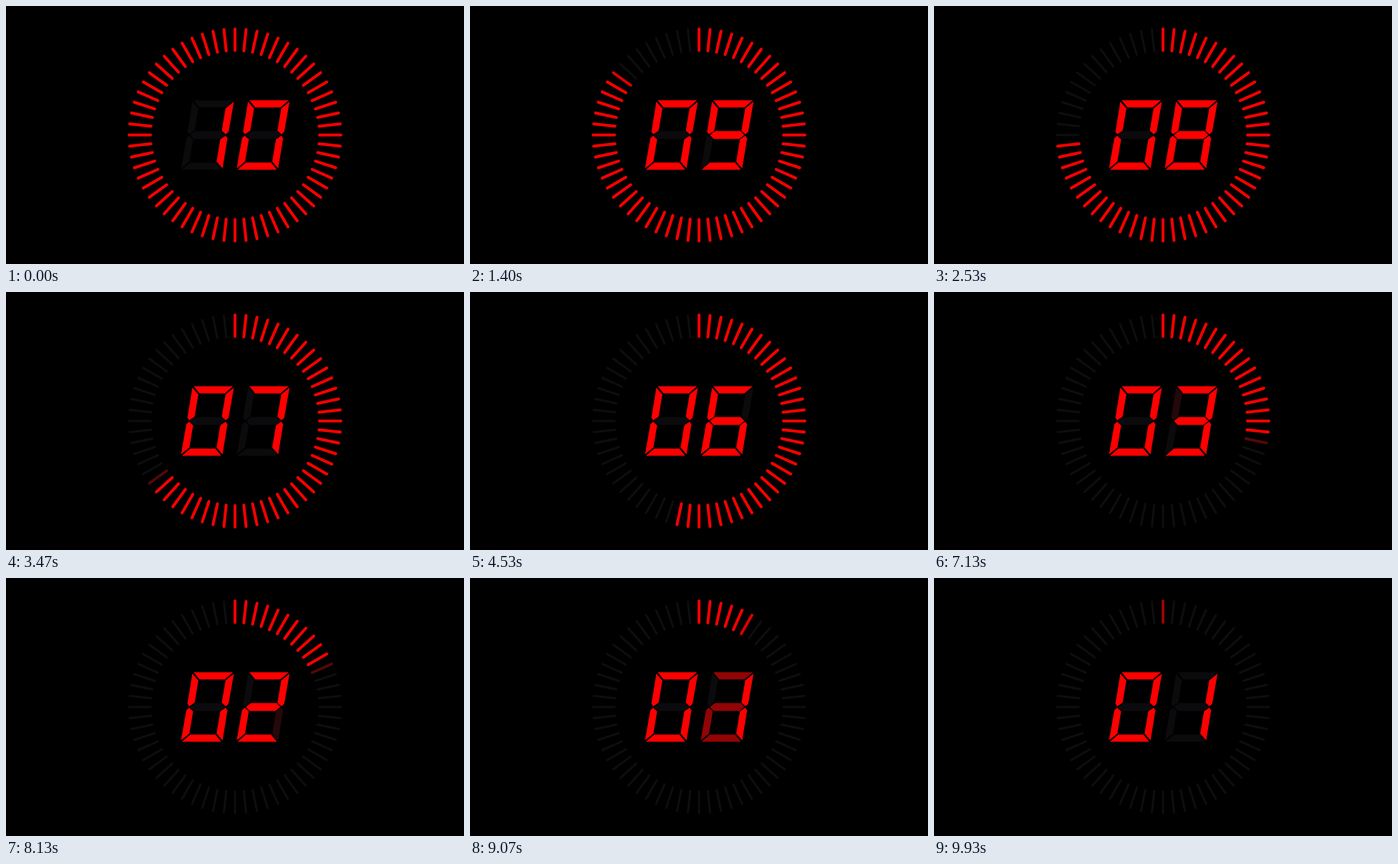
These frames come from a looping animation (640 by 360 pixels, 9990 ms). An HTML page with a canvas:

```html
<!DOCTYPE html>
<html lang="en">
<head>
<meta charset="utf-8">
<title>Countdown</title>
<style>
  html, body { margin: 0; width: 100%; height: 100%; overflow: hidden; background: #000; }
  canvas { display: block; width: 640px; height: 360px; }
</style>
</head>
<body>
<canvas id="stage" width="640" height="360"></canvas>
<script>
const ctx = document.getElementById('stage').getContext('2d');

const LOOP = 9990, FPS = 15, SECONDS = 10, TICKS = 60;
const CX = 320, CY = 180, INNER = 118, OUTER = 148;
const DIGIT_X = [252.5, 330.3], DIGIT_W = 58, SLANT = 0.17;
const SEGMENT_FADE = 150;
const RED = '#ff0000', TICK_OFF = '#0e0e0e', SEGMENT_OFF = '#0b0a0c';

// Upright segment outlines, with y measured from the digit's middle.
const flipX = points => points.map(([x, y]) => [DIGIT_W - x, y]);
const flipY = points => points.map(([x, y]) => [x, -y]);
const topBar = [[1.5, -48.5], [56.5, -48.5], [46.5, -38.5], [11.5, -38.5]];
const upperLeft = [[0, -46.5], [10, -37], [10, -6], [3.5, -1], [0.3, -4.5]];
const middleBar = [[5, 0], [11, -5.5], [47, -5.5], [53, 0], [47, 5.5], [11, 5.5]];
const SEGMENTS = {
  a: topBar,
  b: flipX(upperLeft),
  c: flipX(flipY(upperLeft)),
  d: flipY(topBar),
  e: flipY(upperLeft),
  f: upperLeft,
  g: middleBar
};
const GLYPHS = ['abcdef', 'bc', 'abdeg', 'abcdg', 'bcfg', 'acdfg', 'acdefg', 'abc', 'abcdefg', 'abcdfg'];

function drawTick(index, color, alpha, width) {
  const angle = -Math.PI / 2 - index / TICKS * Math.PI * 2;
  const cos = Math.cos(angle), sin = Math.sin(angle);
  ctx.globalAlpha = alpha;
  ctx.strokeStyle = color;
  ctx.lineWidth = width;
  ctx.beginPath();
  ctx.moveTo(CX + cos * INNER, CY + sin * INNER);
  ctx.lineTo(CX + cos * OUTER, CY + sin * OUTER);
  ctx.stroke();
}

function drawSegment(points, left, color, alpha) {
  ctx.globalAlpha = alpha;
  ctx.fillStyle = color;
  ctx.beginPath();
  for (const [x, y] of points) ctx.lineTo(left + x - y * SLANT, CY + y);
  ctx.fill();
}

function drawRing(ms) {
  const progress = ms / 1000 / SECONDS * TICKS;
  for (let i = 1; i <= TICKS; i++) {
    const level = Math.max(0, Math.min(1, (i - progress) * 1.4));
    if (level < 1) drawTick(i, TICK_OFF, 1, 3);
    if (level > 0) drawTick(i, RED, level, 4);
  }
}

function drawDigit(left, glyph, previous, afterglow) {
  for (const name in SEGMENTS) {
    const level = glyph.includes(name) ? 1 : previous.includes(name) ? afterglow : 0;
    drawSegment(SEGMENTS[name], left, SEGMENT_OFF, 1);
    if (level > 0) drawSegment(SEGMENTS[name], left, RED, level);
  }
}

function drawNumber(ms) {
  const elapsed = Math.floor(ms / 1000 + 1e-6);
  const value = SECONDS - elapsed;
  const before = Math.min(SECONDS, value + 1);
  const afterglow = Math.max(0, 1 - (ms - elapsed * 1000) / SEGMENT_FADE);
  const glyphs = n => [n < 10 ? GLYPHS[0] : GLYPHS[1], GLYPHS[n % 10]];
  const now = glyphs(value), old = glyphs(before);
  DIGIT_X.forEach((left, i) => drawDigit(left, now[i], old[i], afterglow));
}

function render(now) {
  const frame = Math.floor((now % LOOP + 3.4) * FPS / 1000);
  const ms = frame * 1000 / FPS;
  ctx.globalAlpha = 1;
  ctx.fillStyle = '#000';
  ctx.fillRect(0, 0, 640, 360);
  ctx.lineCap = 'round';
  drawRing(ms);
  drawNumber(ms);
}

const startTime = performance.now();
function animate() {
  render(performance.now() - startTime);
  requestAnimationFrame(animate);
}
animate();
</script>
</body>
</html>
```
